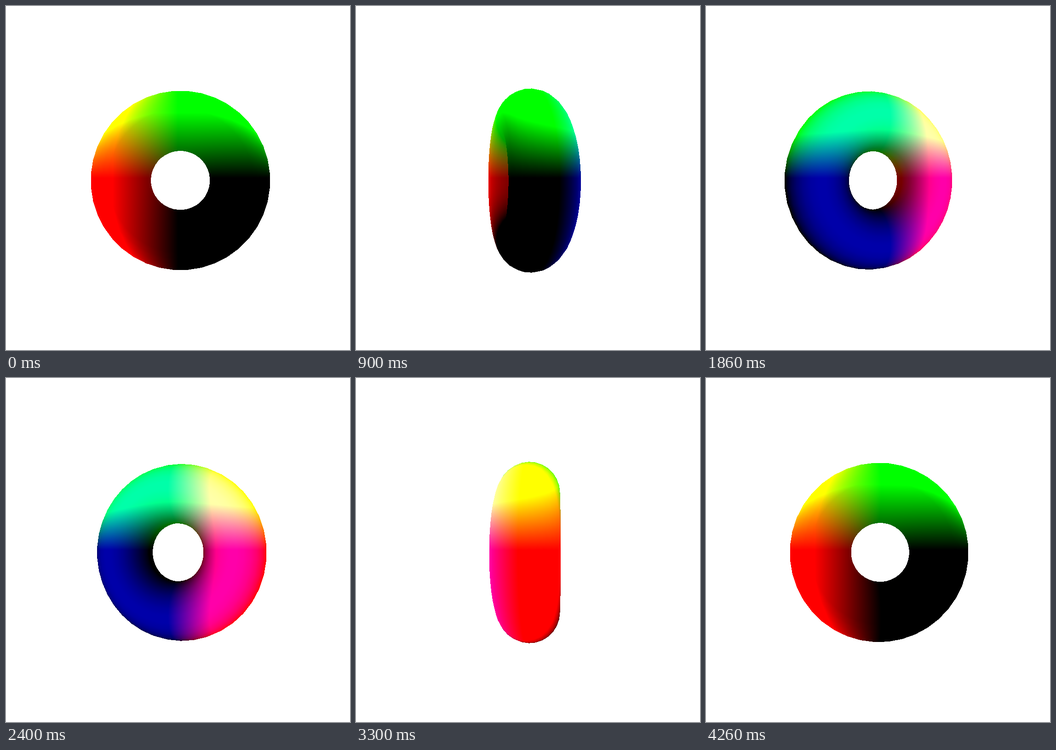
An HTML page with a canvas for the animation above (4.32 s loop, 748x748 px).

```html
<!DOCTYPE html>
<html lang="en">
<head>
<meta charset="utf-8">
<title>Spinning torus</title>
<style>
  html, body { margin: 0; width: 748px; height: 748px; overflow: hidden; background: #fff; }
  canvas { display: block; }
</style>
</head>
<body>
<canvas id="stage" width="748" height="748"></canvas>
<script>
const SIZE = 748, MID = SIZE / 2;
const STEP_MS = 60, STEPS = 72;
const RING = 0.992, TUBE = 0.497;
const RING_SEGS = 40, TUBE_SEGS = 28;
const OFFSET = [0.04, -0.04, 0.04];   // torus centre relative to the spin axis
const DIST = 5.5, FOCAL = 707;
const LIGHT_Z = 0.8, LIGHT_GAIN = 0.56;

const ctx = document.getElementById('stage').getContext('2d');
const image = ctx.createImageData(SIZE, SIZE);
const pixels = image.data;
const depth = new Float32Array(SIZE * SIZE);

const verts = [], tris = [];

// Brightness at a tube angle: surfaces facing away from a point on the torus axis are lit.
function brightness(b) {
  const nr = Math.cos(b), nz = Math.sin(b);
  const dr = RING + TUBE * nr, dz = TUBE * nz - LIGHT_Z;
  return 1 + LIGHT_GAIN * Math.max(0, (nr * dr + nz * dz) / Math.hypot(dr, dz));
}

function buildTorus() {
  for (let i = 0; i < RING_SEGS; i++) {
    const a = (i + 0.5) / RING_SEGS * 2 * Math.PI;
    for (let j = 0; j < TUBE_SEGS; j++) {
      const b = j / TUBE_SEGS * 2 * Math.PI;
      const rad = RING + TUBE * Math.cos(b);
      verts.push({
        x: rad * Math.cos(a) + OFFSET[0],
        y: rad * Math.sin(a) + OFFSET[1],
        z: TUBE * Math.sin(b) + OFFSET[2],
        lit: brightness(b)
      });
      const i2 = (i + 1) % RING_SEGS, j2 = (j + 1) % TUBE_SEGS;
      const p = i * TUBE_SEGS + j, q = i2 * TUBE_SEGS + j;
      const r = i2 * TUBE_SEGS + j2, s = i * TUBE_SEGS + j2;
      tris.push([p, q, r], [p, r, s]);
    }
  }
}

function project({ x, y, z, lit }, sin, cos) {
  const inv = 1 / (DIST - (x * sin + z * cos));
  return {
    sx: MID + FOCAL * (x * cos - z * sin) * inv,
    sy: MID - FOCAL * y * inv,
    inv,
    // surface colour follows position, divided by depth for interpolation
    r: -x * lit * inv, g: y * lit * inv, b: -z * lit * inv
  };
}

function fillTriangle(A, B, C) {
  const area = (B.sx - A.sx) * (C.sy - A.sy) - (B.sy - A.sy) * (C.sx - A.sx);
  if (Math.abs(area) < 1e-9) return;
  const x0 = Math.floor(Math.min(A.sx, B.sx, C.sx)), x1 = Math.ceil(Math.max(A.sx, B.sx, C.sx));
  const y0 = Math.floor(Math.min(A.sy, B.sy, C.sy)), y1 = Math.ceil(Math.max(A.sy, B.sy, C.sy));
  for (let y = y0; y < y1; y++) {
    const py = y + 0.5;
    for (let x = x0; x < x1; x++) {
      const px = x + 0.5;
      const u = ((B.sx - px) * (C.sy - py) - (B.sy - py) * (C.sx - px)) / area;
      const v = ((C.sx - px) * (A.sy - py) - (C.sy - py) * (A.sx - px)) / area;
      const w = 1 - u - v;
      if (u < -1e-7 || v < -1e-7 || w < -1e-7) continue;
      const inv = u * A.inv + v * B.inv + w * C.inv;
      const k = y * SIZE + x;
      if (inv <= depth[k]) continue;
      depth[k] = inv;
      const scale = 255 / inv, o = k * 4;
      // the clamped array limits each channel to 0..255
      pixels[o] = (u * A.r + v * B.r + w * C.r) * scale;
      pixels[o + 1] = (u * A.g + v * B.g + w * C.g) * scale;
      pixels[o + 2] = (u * A.b + v * B.b + w * C.b) * scale;
    }
  }
}

function draw(step) {
  const angle = step / STEPS * 2 * Math.PI;
  const sin = Math.sin(angle), cos = Math.cos(angle);
  pixels.fill(255);
  depth.fill(0);
  const pts = verts.map(v => project(v, sin, cos));
  for (const [a, b, c] of tris) fillTriangle(pts[a], pts[b], pts[c]);
  ctx.putImageData(image, 0, 0);
}

let shown = 0;
const start = performance.now();

function tick() {
  const step = Math.floor((performance.now() - start) / STEP_MS) % STEPS;
  if (step !== shown) draw(shown = step);
  requestAnimationFrame(tick);
}

buildTorus();
draw(0);
requestAnimationFrame(tick);
</script>
</body>
</html>
```
